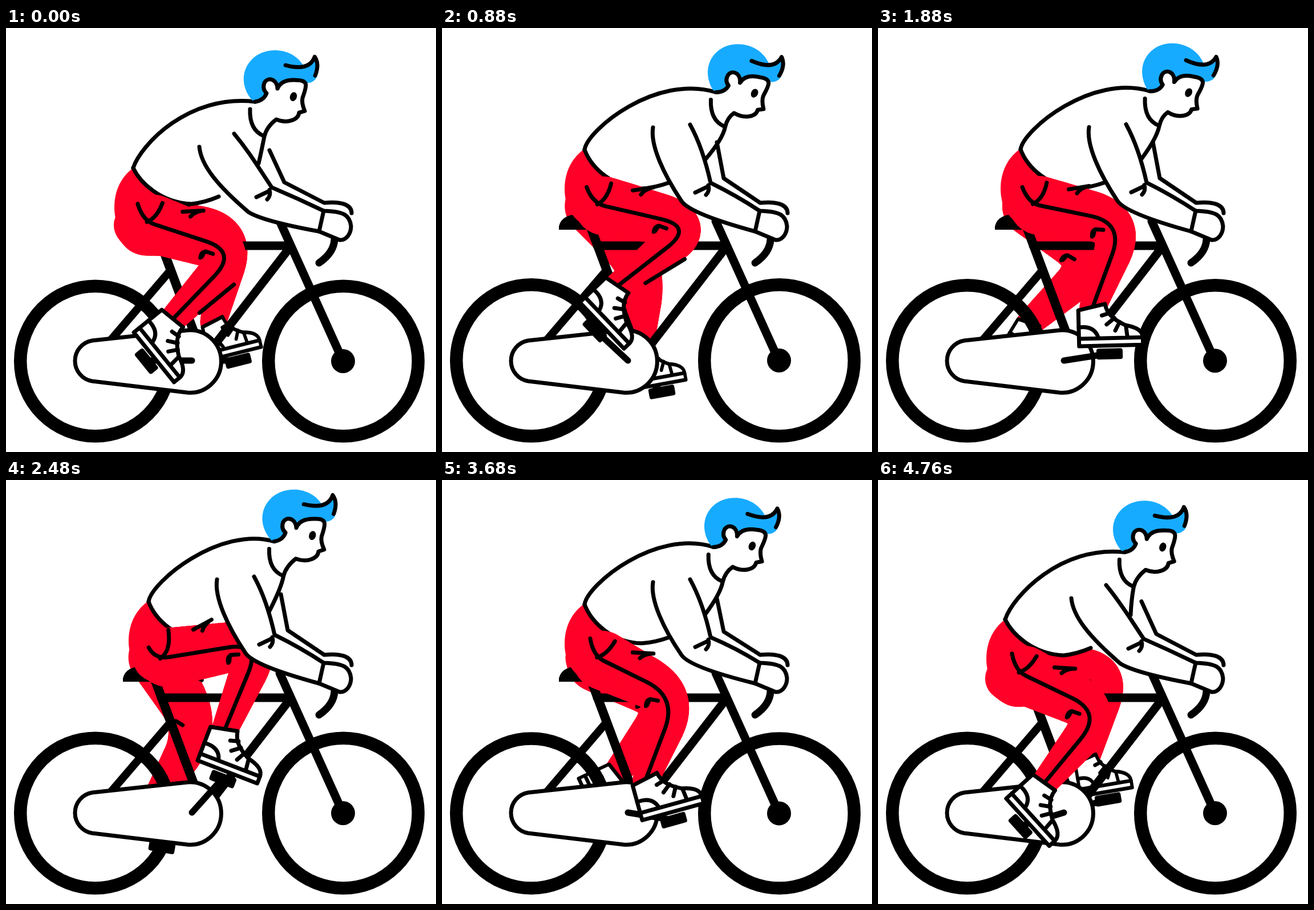
Recreate the animation shown at these times as an HTML page with a canvas. Size 754x742 px, loop 4800 ms.

```html
<!DOCTYPE html>
<html lang="en">
<head>
<meta charset="utf-8">
<title>Cyclist</title>
<style>
  html, body { margin: 0; width: 100%; height: 100%; overflow: hidden; background: #fff; }
  canvas { display: block; }
</style>
</head>
<body>
<canvas id="stage" width="754" height="742"></canvas>
<script>
const ctx = document.getElementById('stage').getContext('2d');
const LOOP = 4800, STEP = 40, RAD = Math.PI / 180;
const RED = '#ff0028', BLUE = '#17abff', WHITE = '#fff', BLACK = '#000';
const CRANK = [326, 582], CRANK_LENGTH = 80, THIGH = 157, SHIN = 146;
const NEAR_FOOT = { size: [1, 1], shift: 0 }, FAR_FOOT = { size: [.82, .93], shift: -3 };

// Vectors; arrays print as "x,y" inside path strings.
const add = (a, b, k = 1) => [a[0] + b[0] * k, a[1] + b[1] * k];
const sub = (a, b) => add(a, b, -1);
const lerp = (a, b, t) => [a[0] + (b[0] - a[0]) * t, a[1] + (b[1] - a[1]) * t];
const unit = v => { const n = Math.hypot(...v); return [v[0] / n, v[1] / n]; };
const rotate = ([x, y], deg) => {
  const c = Math.cos(deg * RAD), s = Math.sin(deg * RAD);
  return [x * c - y * s, x * s + y * c];
};
const smooth = x => { x = Math.min(1, Math.max(0, x)); return x * x * (3 - 2 * x); };

const fill = (d, color) => { ctx.fillStyle = color; ctx.fill(new Path2D(d)); };
const line = (d, width = 7) => {
  ctx.strokeStyle = BLACK;
  ctx.lineWidth = width;
  ctx.stroke(new Path2D(d));
};
const disc = (p, r, color) => {
  ctx.fillStyle = color;
  ctx.beginPath();
  ctx.arc(p[0], p[1], r, 0, 7);
  ctx.fill();
};
const placed = (p, deg, draw) => {
  ctx.save();
  ctx.translate(...p);
  ctx.rotate(deg * RAD);
  draw();
  ctx.restore();
};

// Looping cubic curve through one value per key time; wrap is the gain per loop.
const KEYS = [0, 880, 1440, 2480, 3280, 4040, 4760];
function track(values, wrap = 0) {
  const n = KEYS.length;
  const at = i => {
    const turns = Math.floor(i / n), k = i - turns * n;
    return [KEYS[k] + turns * LOOP, values[k] + turns * wrap];
  };
  const slope = i => {
    const [t0, v0] = at(i - 1), [t1, v1] = at(i + 1);
    return (v1 - v0) / (t1 - t0);
  };
  return time => {
    let i = n - 1;
    while (KEYS[i] > time) i--;
    const [t0, v0] = at(i), [t1, v1] = at(i + 1), d = t1 - t0, s = (time - t0) / d;
    return v0 + (v1 - v0) * s * s * (3 - 2 * s)
      + d * s * (1 - s) * (slope(i) * (1 - s) - slope(i + 1) * s);
  };
}
const crankTurn = track([180, 583, 826, 1392, 1632, 1984, 2323], 2160);
const bodyBob = track([0, 0, 0, 0, 9, 0, -1]);
const headNod = track([-7, 1, 6, -1, -6, 1, -4.5]);
const neckShift = track([0, 2, 2, -3, -4, -1, -3]);
const nearTilt = track([-1, -4, 2, 15, 3, -5, 0]);
const farTilt = track([-2, 0, -10, -24, 5, 13, -2]);
const wheelLift = track([0, 2.5, 2.5, 0, -1.5, 0, 0]);

function solveLeg(hip, pedal, tilt, { size, shift }) {
  const ankle = add(pedal, rotate([-27 * size[0] + shift, -81 * size[1]], tilt));
  const reach = Math.hypot(...sub(ankle, hip)), dir = unit(sub(ankle, hip));
  const along = (THIGH ** 2 - SHIN ** 2 + reach ** 2) / (2 * reach);
  const out = Math.sqrt(Math.max(0, THIGH ** 2 - along ** 2));
  const knee = add(add(hip, dir, along), [dir[1], -dir[0]], out);
  const up = unit(sub(hip, knee)), down = unit(sub(ankle, knee));
  const front = unit(add(up, down).map(v => -v));
  const corner = add(knee, front, 20 * (1 + up[0] * down[0] + up[1] * down[1]));
  const angle = Math.atan2(-up[1], -up[0]) / RAD;
  const top = add(hip, [-9 + .12 * angle, 25 - .36 * angle]);
  return {
    hip, knee, ankle, front, corner, angle, top,
    bendIn: add(corner, unit(sub(top, corner)), 60),
    bendOut: add(corner, unit(sub(ankle, corner)), 60)
  };
}

function drawTrousers({ hip, knee, ankle, front, corner, angle, top, bendIn, bendOut }) {
  const N = 36;
  for (let i = 0; i <= N; i++) {
    const s = i / N;
    disc(lerp(top, bendIn, s), Math.min(38 + s * 80, 53 - 9 * s), RED);
    disc(lerp(lerp(bendIn, corner, s), lerp(corner, bendOut, s), s), 44 - 11 * s, RED);
    disc(lerp(bendOut, ankle, s), 33 - 10 * s, RED);
  }
  placed(hip, angle, () => line('M57,-31L88,-50M73,-30Q75,-39 83,-46'));
  placed(knee, Math.atan2(-front[1], -front[0]) / RAD, () => line('M43,3Q40,12 32,12L20,5M34,11L40,4'));
}

function drawSeams(leg, showEdge) {
  const { hip, ankle, corner, angle, top, bendIn, bendOut } = leg;
  const start = add(hip, rotate([20, 0], 165 + 2.15 * angle));
  const pocket = add(hip, [13 + .58 * angle, -29 + .47 * angle]);
  line(`M${start}Q${top} ${lerp(top, bendIn, .2)}L${bendIn}Q${corner} ${bendOut}L${ankle}`);
  line(`M${lerp(top, bendIn, .07)}Q${add(hip, [20, 10])} ${pocket}`);
  if (showEdge) {
    const d = unit(sub(ankle, corner)), side = [d[1], -d[0]];
    line(`M${add(lerp(corner, ankle, .28), side, 35)}L${add(lerp(corner, ankle, .75), side, 26)}`);
  }
}

function drawShoe(pedal, tilt, { size, shift }) {
  placed(pedal, tilt, () => {
    ctx.fillStyle = BLACK;
    ctx.beginPath();
    ctx.roundRect(-22, -9, 46, 19, 4);
    ctx.fill();
    ctx.translate(shift, 0);
    ctx.scale(...size);
    const outline = 'M-52,-77L-5,-87C-2,-68 12,-58 30,-49Q60,-43 60,-27L60,-14L-52,-14Z';
    fill(outline, WHITE);
    line(outline);
    line('M-52,-27H60M-52,-47Q-24,-50 -18,-28M33,-28L31,-46M-11,-67L3,-71M-3,-51L11,-62M12,-40L20,-55');
  });
}

function drawBike(lift) {
  ctx.strokeStyle = BLACK;
  ctx.lineWidth = 22.5;
  for (const x of [156.5, 591.5]) {
    ctx.beginPath();
    ctx.ellipse(x, 583 - lift / 2, 131.3, 131.3 + lift / 2, 0, 0, 7);
    ctx.stroke();
  }
  disc([591, 583 - lift / 2], 21, BLACK);
  line('M480,338L591,583M272,381H497M497,385L350,575', 15);
  line('M262,352L340,560', 16);
  line('M285,428L170,562', 14);
  line('M576,370Q575,393 549,411', 13);
  fill('M205,353V347Q210,326 240,326H256L268,353Z', BLACK);
  const guard = 'M151,547L318,529A54.7,54.7 0 1 1 318,638L151,618A36,36 0 0 1 151,547Z';
  fill(guard, WHITE);
  line(guard);
}

function drawHead(neck, nod) {
  placed(neck, nod, () => {
    ctx.translate(-437, -130);
    fill('M432,128C412,105 412,76 430,57C452,33 500,33 521,66C532,68 539,62 541,52C549,66 548,80 543,90Q536,98 526,97L480,120L455,125Z', BLUE);
    const face = 'M437,130Q452,128 457,115Q449,108 453,97C459,86 475,90 476,107Q483,90 510,92C530,92 528,101 520,123Q518,132 524,146L514,149C513,161 494,169 474,161';
    fill(face, WHITE);
    line(face);
    line('M490,66Q532,77 541,51Q550,64 542,84');
    ctx.fillStyle = BLACK;
    ctx.beginPath();
    ctx.ellipse(504, 121, 6, 8, .3, 0, 7);
    ctx.fill();
  });
}

function draw(time) {
  const turn = crankTurn(time), bob = bodyBob(time);
  const pulse = Math.cos((2 * turn - 50) * RAD);
  const back = 1 - smooth(time / 440) + smooth((time - 4460) / 280);
  // Blends the sitting-back pose with the forward pose.
  const pose = (ax, ay, bx, by, k = 0) => add(lerp([bx, by], [ax, ay], back), [0, bob * k]);
  const pedalAt = deg => add(CRANK, rotate([CRANK_LENGTH, 0], deg));
  const tiltAt = deg => 20 - 32 * Math.cos(deg * RAD) - 10 * Math.sin(deg * RAD);

  ctx.fillStyle = WHITE;
  ctx.fillRect(0, 0, 754, 742);
  ctx.lineCap = ctx.lineJoin = 'round';

  const hip = pose(245, 322, 270, 290, 1);
  const nearPedal = pedalAt(turn), nearAngle = tiltAt(turn) + nearTilt(time);
  const farPedal = pedalAt(turn + 180), farAngle = tiltAt(turn + 180) + farTilt(time);

  line(`M${CRANK}L${farPedal}`, 11);
  drawTrousers(solveLeg(add(hip, [-11, 4]), farPedal, farAngle, FAR_FOOT));
  drawShoe(farPedal, farAngle, FAR_FOOT);
  drawBike(wheelLift(time));

  placed(hip, 0, () => fill('M-22,-77C-45,-60 -55,-35 -55,-8C-55,25 -38,55 5,65L70,45L60,-40Z', RED));

  // Torso
  const neck = add(pose(435, 127, 476, 110, 1), [3 * pulse + neckShift(time), 3 * pulse]);
  const nod = 4 + 5 * pulse + headNod(time);
  const throat = add(neck, rotate([37, 31], nod));
  const waist = pose(223, 245, 250, 213, 1);
  const chest = pose(443, 237, 461, 231, 1);
  const hemEnd = pose(373, 295, 400, 270, 1);
  const spine = `C${pose(236, 205, 255, 178, 1)} ${pose(320, 115, 375, 80, 1)} ${neck}`;
  const front = `Q${add(neck, [20, 44])} ${add(neck, [16, 61])}Q${add(neck, [12, 82])} ${chest}`;
  const hem = `M${waist}C${pose(235, 270, 262, 245, 1)} ${pose(270, 305, 300, 280, 1)} `
    + `${pose(325, 308, 350, 281, 1)}Q${pose(350, 305, 372, 280, 1)} ${hemEnd}`;
  fill(`M${waist}${spine}L${throat}${front}L${hemEnd}${hem.replace('M', 'L')}Z`, WHITE);
  fill(hem + 'Z', WHITE);
  line(`M${waist}${spine}M${throat}${front}`);
  line(hem);

  // Near leg
  const nearLeg = solveLeg(hip, nearPedal, nearAngle, NEAR_FOOT);
  line(`M${CRANK}L${nearPedal}`, 11);
  drawTrousers(nearLeg);
  drawSeams(nearLeg, Math.cos((turn - 205) * RAD) > .8);
  drawShoe(nearPedal, nearAngle, NEAR_FOOT);

  // Arms
  const elbow = pose(466, 279, 471, 271, .9);
  line(`M${pose(462, 214, 482, 200, 1.5)}L${pose(488, 270, 494, 263, .5)}L558,306C585,303 606,308 606,324`);
  const arm = `M${pose(339, 208, 370, 174, 1)}`
    + `C${pose(342, 240, 365, 205, 1)} ${pose(370, 275, 388, 255, 1)} ${pose(425, 322, 420, 303, .7)}`
    + `Q${pose(450, 338, 435, 325, .6)} 549,356L585,371C598,372 605,358 605,347C603,327 592,321 557,320`
    + `Q${pose(511, 298, 516, 293, .3)} ${elbow}`
    + `C${pose(440, 240, 463, 235, .7)} ${pose(425, 215, 452, 200, 1)} ${pose(400, 185, 435, 169, 1)}`;
  fill(arm, WHITE);
  line(arm);
  line('M557,320L549,356');
  placed(elbow, 0, () => line('M-27,17L-6,7M-4,4Q-1,14 -8,21'));

  const collar = [[-9, 13], [-10, 38], [-2, 53], [15, 60]].map(p => add(neck, p));
  line(`M${collar[0]}C${collar[1]} ${collar[2]} ${collar[3]}`);
  drawHead(neck, nod);
}

const begin = performance.now();
function tick() {
  const time = (performance.now() - begin) % LOOP;
  draw(Math.floor(time / STEP) * STEP);
  requestAnimationFrame(tick);
}
tick();
</script>
</body>
</html>
```
